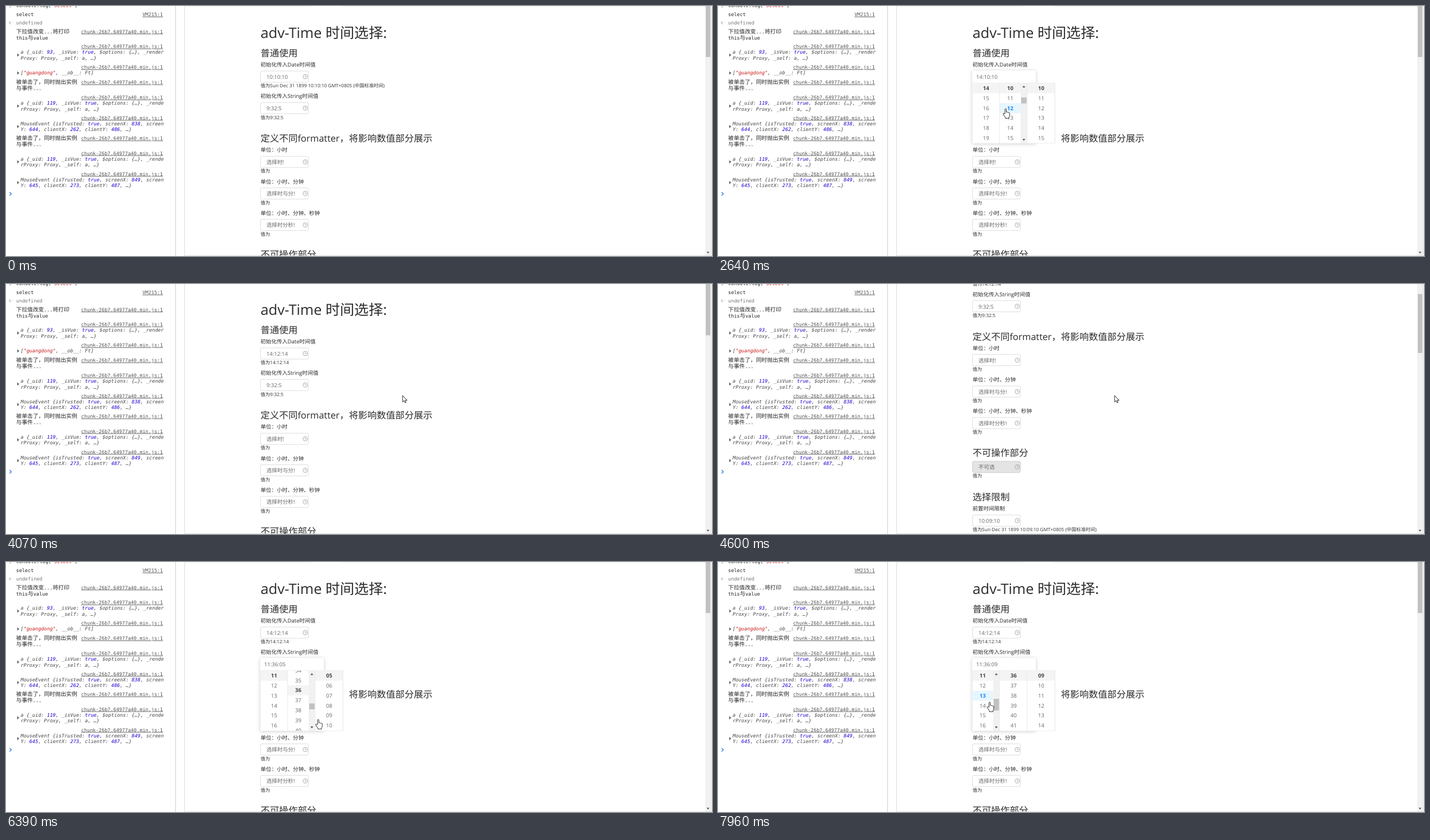
An HTML page that plays this animation: 1255 px wide and 446 px high, repeating every 7.99 s.

```html
<!DOCTYPE html>
<html lang="zh-CN">
<head>
<meta charset="utf-8">
<title>adv-Time</title>
<style>
html, body { margin: 0; width: 100%; height: 100%; overflow: hidden; background: #fff; }
svg { display: block; }
text { white-space: pre; text-rendering: geometricPrecision; }
#page { font-family: 'Open Sans', 'Noto Sans CJK SC', 'Noto Sans CJK', sans-serif; fill: #2b2b2b; }
#console { font: 8.63px 'DejaVu Sans Mono', 'Noto Sans CJK SC', 'Noto Sans CJK', monospace; fill: #222; }
#console .obj { font-style: italic; fill: #444; }
#console .link { text-decoration: underline; text-anchor: end; fill: #555; }
.cjk { font-size: 9.9px; }
.num { fill: #1c00cf; }
.str { fill: #c41a16; }
.mid { text-anchor: middle; }
.panel { filter: drop-shadow(0 1px 3px #0003); }
</style>
</head>
<body>
<svg id="stage" width="1255" height="446" viewBox="0 0 1255 446">
  <g id="console"></g>
  <g id="page"></g>
  <g id="pointer"></g>
</svg>
<script>
const LOOP = 7990, ROW = 17.8, COL = 49, BAR = 12, LIST_H = 107, LEFT = 452, SCROLL = 142.5;
const $ = id => document.getElementById(id);

const text = (x, y, s, attrs = '') => `<text x="${x}" y="${y}" ${attrs}>${s}</text>`;
const rect = (x, y, w, h, fill, attrs = '') =>
  `<rect x="${x}" y="${y}" width="${w}" height="${h}" fill="${fill}" ${attrs}/>`;
const path = (d, attrs) => `<path d="${d}" ${attrs}/>`;
const clamp = v => Math.min(1, Math.max(0, v));
const ease = v => v * v * (3 - 2 * v);
const ramp = (t, from, to) => ease(clamp((t - from) / (to - from)));

// ---- console ----
const LINK = 'chunk-26b7.64977a40.min.js:1';
const color = s => s
  .replace(/("[^"]*")|\b(true|\d+)\b/g, (m, str) => `<tspan class="${str ? 'str' : 'num'}">${m}</tspan>`)
  .replace(/[\u3000-\uffff]+/g, m => `<tspan class="cjk">${m}</tspan>`);
const link = (y, s = LINK) => text(279, y + 3, s, 'class="link"');
const log = (y, lines) => link(y) +
  lines.map((s, i) => text(18, y + 3.3 + i * 11, color(s))).join('');
const obj = (y, lines) => link(y) +
  path(`M20 ${y + 2.5 + lines.length * 5}l3.6 3-3.6 3z`, 'fill="#666"') +
  lines.map((s, i) => text(26, y + 13.2 + i * 10.5, color(s), 'class="obj"')).join('');

const clicked = ['被单击了，同时抛出实例', '与事件...'];
const button = ['a {_uid: 119, _isVue: true, $options: {…}, _rende', 'rProxy: Proxy, _self: a, …}'];
$('console').innerHTML =
  path('M6-3l3 3-3 3', 'fill="none" stroke="#888"') +
  text(18, 2, color('console.log("select")')) +
  text(18, 18, 'select') + link(15, 'VM215:1') +
  path('M8.5 27l-3 3 3 3M6 30h2M10 30h1', 'fill="none" stroke="#aaa"') +
  text(18, 33, 'undefined', 'fill="#777"') +
  log(45.5, ['下拉值改变...将打印', 'this与value']) +
  obj(72, ['a {_uid: 93, _isVue: true, $options: {…}, _render', 'Proxy: Proxy, _self: a, …}']) +
  obj(109, ['["guangdong", __ob__: Ft]']) +
  log(136, clicked) +
  obj(163, button) +
  obj(199.5, ['MouseEvent {isTrusted: true, screenX: 838, screen', 'Y: 644, clientX: 262, clientY: 486, …}']) +
  log(236, clicked) +
  obj(262.5, button) +
  obj(299.5, ['MouseEvent {isTrusted: true, screenX: 849, screen', 'Y: 645, clientX: 273, clientY: 487, …}']) +
  path('M6.5 332l3 3-3 3', 'fill="none" stroke="#2f7de1" stroke-width="1.4"') +
  rect(301, 0, 1, 446, '#ccc');

// ---- time pickers: [time, value] after each pick, and the spans when open ----
const DATE = s => `Sun Dec 31 1899 ${s} GMT+0805 (中国标准时间)`;
const pickers = [
  { y: 126, open: [[1560, 3950]],
    picks: [[0, '10:10:10'], [2260, '14:10:10'], [2870, '14:12:10'], [3640, '14:12:14']] },
  { y: 182.2, open: [[5150, 7050], [7450, LOOP]],
    picks: [[0, '9:32:5'], [5730, '11:32:05'], [6220, '11:36:05'], [6650, '11:36:09']] },
];
const isOpen = (p, t) => p.open.some(([a, b]) => t >= a && t < b);
const pickAt = (p, t) => p.picks.filter(([at]) => at <= t).length - 1;
const value = (p, t) => p.picks[pickAt(p, t)][1];
const part = (p, k, i) => +p.picks[k][1].split(':')[i];

// ---- pointer ----
const moves = [
  [110, 734, 450], [400, 620, 275], [690, 515, 132], [870, 514, 132], [1570, 514, 132], [1700, 514, 140],
  [1890, 506, 171], [2200, 478, 214], [2360, 478, 214], [2720, 516, 179], [2900, 516, 179],
  [3180, 606, 224], [3380, 606, 224], [3580, 576, 214], [3700, 576, 214], [3920, 705, 199],
  [4720, 705, 199], [5010, 503, 183], [5400, 503, 183], [5580, 478, 234], [5850, 478, 234],
  [6150, 520, 270], [6250, 520, 270], [6390, 555, 281], [6560, 576, 270], [6720, 576, 270],
  [7000, 780, 240], [7060, 780, 240], [7350, 510, 184], [7550, 510, 184], [7750, 480, 225], [7960, 483, 250],
];
function mouse(t) {
  const i = moves.findIndex(m => m[0] > t);
  if (i === 0) return [734, 460];
  if (i < 0) return moves[moves.length - 1].slice(1);
  const [a, x0, y0] = moves[i - 1], [b, x1, y1] = moves[i], k = ramp(t, a, b);
  return [x0 + (x1 - x0) * k, y0 + (y1 - y0) * k];
}
const HAND = 'M-1.2 9V1.2a1.2 1.2 0 0 1 2.4 0V6q1.3-.8 2.2.4 1.3-.6 2 .6 1.6-.3 1.8 1V11.5q0 2-1.3 3.5V17H-.5V15.5L-4.5 9.8q-.3-1.6 1.3-1.4z';
const ARROW = 'M0 0V11.5L2.7 9 4.5 13 6.2 12.2 4.5 8.4H8z';
const BEAM = 'M-2.5-5.5H2.5M0-5.5V5.5M-2.5 5.5H2.5';
function pointer(t) {
  const [x, y] = mouse(t);
  const list = pickers.some(p => isOpen(p, t) && x > LEFT && x < LEFT + 3 * COL && y > p.y + 11.5 && y < p.y + 119);
  const field = pickers.some(p => x > LEFT && x < LEFT + 86 && Math.abs(y - p.y) < 11);
  const shape = list ? HAND : field ? BEAM : ARROW;
  return path(shape, `transform="translate(${x.toFixed(1)} ${y.toFixed(1)})" stroke="#111" ` +
    `stroke-width=".9" stroke-linejoin="round" fill="${field && !list ? 'none' : '#fff'}"`);
}

// ---- page ----
const h3 = (y, s) => text(LEFT + 0.5, y + 6.2, s, 'font-size="16.5"');
const label = (y, s) => text(LEFT + 0.5, y + 3.5, s, 'font-size="9.6"');
const result = (y, s = '') => text(LEFT + 0.5, y + 2.7, '值为' + s, 'font-size="8.45" fill="#333"');
const field = (y, s, off) =>
  rect(452.5, y - 10, 85, 20, off ? '#e4e4e4' : '#fff', `rx="2" stroke="${off ? '#ccc' : '#ddd'}"`) +
  text(463, y + 3.8, s, 'font-size="9.6" fill="#666"') +
  `<circle cx="532" cy="${y}" r="4" fill="none" stroke="#999" stroke-width=".8"/>` +
  path(`M532 ${y - 2.5}v2.7h2.2`, 'fill="none" stroke="#999" stroke-width=".8"');

function column(p, i, t) {
  const top = p.y + 11.8, left = LEFT + i * COL, n = i ? 60 : 24;
  const k = pickAt(p, t), now = part(p, k, i), before = part(p, Math.max(0, k - 1), i);
  const s = before + (now - before) * clamp((t - p.picks[k][0]) / 270);
  const [mx, my] = mouse(t - 60), hx = mx - left, hy = my - top;
  const hover = hx >= 0 && hx < COL && hy >= 0 && hy < LIST_H;
  const w = COL - (hover ? BAR : 0);
  const over = hover && hx < w ? Math.floor(hy / ROW + s) : -1;
  let out = '';
  for (let r = Math.floor(s); r < Math.min(n, s + 6.2); r++) {
    const y = (r - s) * ROW, hot = r === over, on = r === now;
    if (hot || on) out += rect(0, y, w, ROW, hot ? '#e6f6ff' : '#f4f4f4');
    out += text(w / 2, y + 12.2, String(r).padStart(2, '0'),
      `class="mid" font-size="9.6" fill="${hot ? '#1b86ee' : on ? '#444' : '#666'}" font-weight="${hot || on ? 700 : 400}"`);
  }
  if (hover) {
    const size = Math.max(10.5, 83 * 6 / n), y = 12 + (83 - size) * clamp(s / (n - 6));
    out += rect(w, 0, BAR, LIST_H, '#f1f1f1') + rect(w + 1, y, 9.5, size, '#c1c1c1') +
      path(`M${w + 3.2} 7.5l2.5-3 2.5 3zM${w + 3.2} 99.5l2.5 3 2.5-3z`, 'fill="#444"');
  }
  return `<svg x="${left}" y="${top}" width="${COL}" height="${LIST_H}">${out}</svg>` +
    rect(left + COL - 1, top, 1, LIST_H, '#ececec');
}
const popup = (p, t) =>
  rect(LEFT, p.y - 11, 113, 130, '#fff', 'class="panel"') +
  rect(LEFT, p.y + 11.5, 3 * COL, 107.5, '#fff', 'stroke="#eee"') +
  text(459, p.y + 3.8, value(p, t), 'font-size="9.6" fill="#666"') +
  [0, 1, 2].map(i => column(p, i, t)).join('');

function page(t) {
  const scroll = SCROLL * (ramp(t, 4050, 4350) - ramp(t, 4650, 4900));
  const [first, second] = pickers.map(p => value(p, t));
  const body =
    rect(318, 0, 223, 0.6, '#e4e4e4') + rect(597, 0, 646, 0.6, '#e4e4e4') +
    text(LEFT + 0.5, 57, 'adv-Time 时间选择:', 'font-size="25.6"') +
    h3(84, '普通使用') +
    label(104.5, '初始化传入Date时间值') + field(126, first) +
    result(142.5, pickAt(pickers[0], t) ? first : DATE(first)) +
    label(160.7, '初始化传入String时间值') + field(182.2, second) + result(199, second) +
    h3(235.8, '定义不同formatter，将影响数值部分展示') +
    label(256.7, '单位：小时') + field(278.2, '选择时!') + result(294.7) +
    label(313, '单位：小时、分钟') + field(334.4, '选择时与分!') + result(351) +
    label(369.3, '单位：小时、分钟、秒钟') + field(390.6, '选择时分秒!') + result(407) +
    h3(443, '不可操作部分') + field(468.8, '不可选', true) + result(485) +
    h3(522.3, '选择限制') + label(543, '前置时间限制') + field(564.6, '10:09:10') +
    result(581, DATE('10:09:10')) +
    pickers.map(p => isOpen(p, t) ? popup(p, t) : '').join('');
  return `<svg width="1243" height="445"><g transform="translate(0 ${-scroll.toFixed(1)})">${body}</g></svg>` +
    rect(1243, 0, 10, 445, '#f1f1f1') +
    rect(1244, -14 + 32 * scroll / SCROLL, 8, 105, '#c1c1c1') +
    path('M1245.7 438.5l2.3 3 2.3-3z', 'fill="#444"') +
    rect(317, 0, 1, 446, '#ddd') + rect(318, 445, 936, 1, '#ddd') + rect(1253, 0, 1, 446, '#ddd');
}

const shown = {};
function put(id, html) {
  if (shown[id] !== html) $(id).innerHTML = shown[id] = html;
}
const start = performance.now();
function frame() {
  const t = (performance.now() - start) % LOOP;
  put('page', page(t));
  put('pointer', pointer(t));
  requestAnimationFrame(frame);
}
frame();
</script>
</body>
</html>
```
